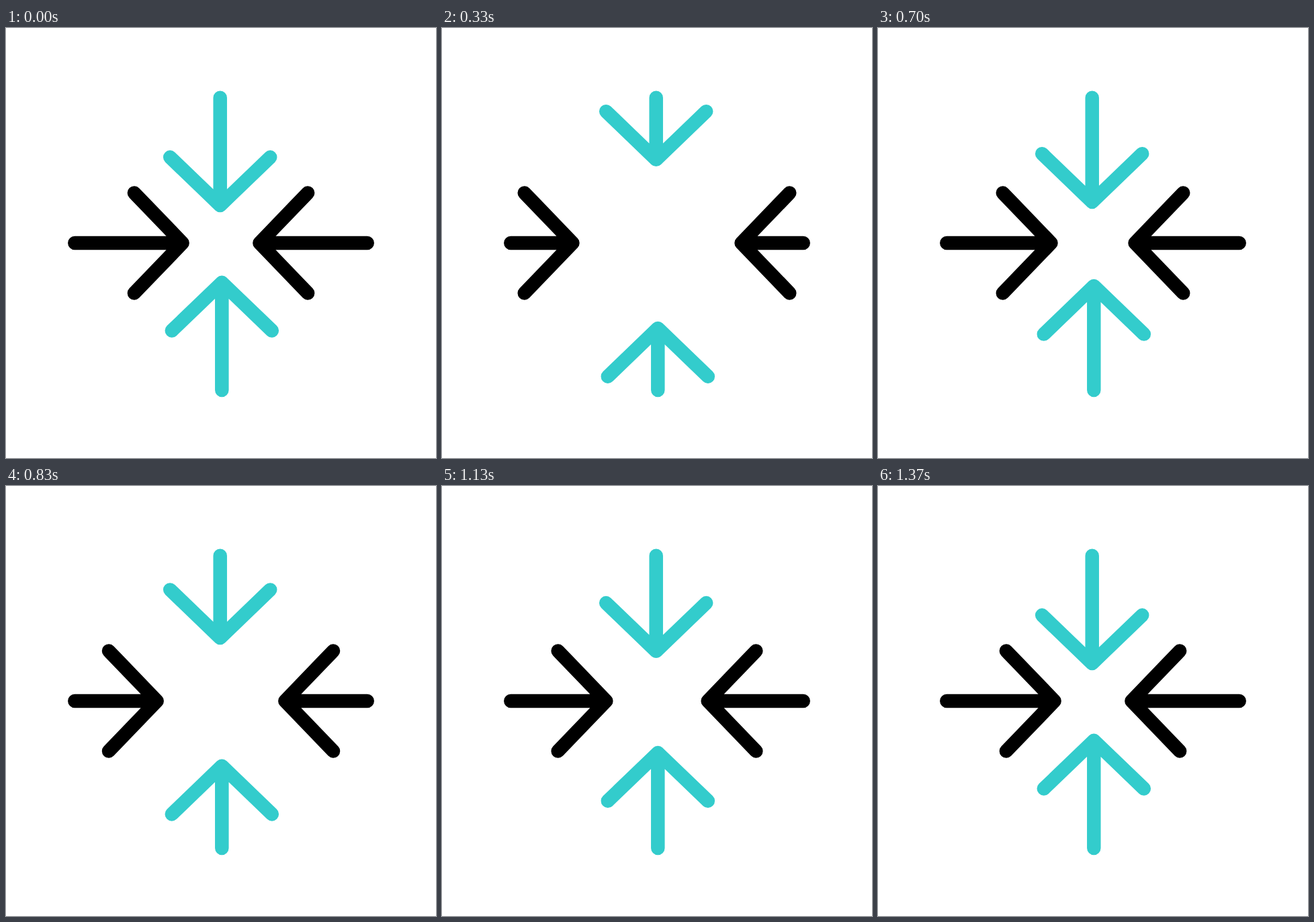
These frames come from a looping animation (640 by 640 pixels, 2000 ms). An HTML page:

```html
<!DOCTYPE html>
<html lang="en">
<head>
<meta charset="utf-8">
<title>Converging arrows</title>
<style>
  html, body { margin: 0; width: 100%; height: 100%; overflow: hidden; background: #fff; }
  svg { display: block; width: 100%; height: 100%; }
  path { fill: none; stroke: #000; stroke-width: 20.5; stroke-linecap: round; stroke-linejoin: round; }
  .teal { stroke: #33cccc; }
</style>
</head>
<body>
<svg viewBox="0 0 640 640">
  <path transform="translate(102.3 320)"/>
  <path transform="translate(537.7 320) rotate(180)"/>
  <path class="teal" transform="translate(318.7 103.7) rotate(90)"/>
  <path class="teal" transform="translate(321.3 539.1) rotate(-90)"/>
</svg>
<script>
  const LOOP = 2000, FPS = 30;
  const LENGTH = 160.3, WING_X = 71.7, WING_Y = 74.5;

  // [frame, pull-back distance]: a bounce that dies away
  const steps = [[0, 0], [15, 92], [22, 0], [27, 58.5], [32, 0], [36, 36.5], [41, 0]];
  const arrows = document.querySelectorAll('path');
  const smooth = p => p * p * (3 - 2 * p);

  function pullAt(frame) {
    const i = steps.findIndex(s => s[0] > frame);
    if (i < 0) return 0;
    const [f0, a] = steps[i - 1], [f1, b] = steps[i];
    return a + (b - a) * smooth((frame - f0) / (f1 - f0));
  }

  // Arrow along +x, with its tail at the local origin
  function arrowPath(pull) {
    const tip = LENGTH - pull, wing = tip - WING_X;
    return `M0 0H${tip}M${wing} ${-WING_Y}L${tip} 0L${wing} ${WING_Y}`;
  }

  function draw() {
    const t = performance.now() % LOOP;
    const frame = Math.floor((t + 5) * FPS / 1000);
    const d = arrowPath(pullAt(frame));
    arrows.forEach(a => a.setAttribute('d', d));
    requestAnimationFrame(draw);
  }
  draw();
</script>
</body>
</html>
```
